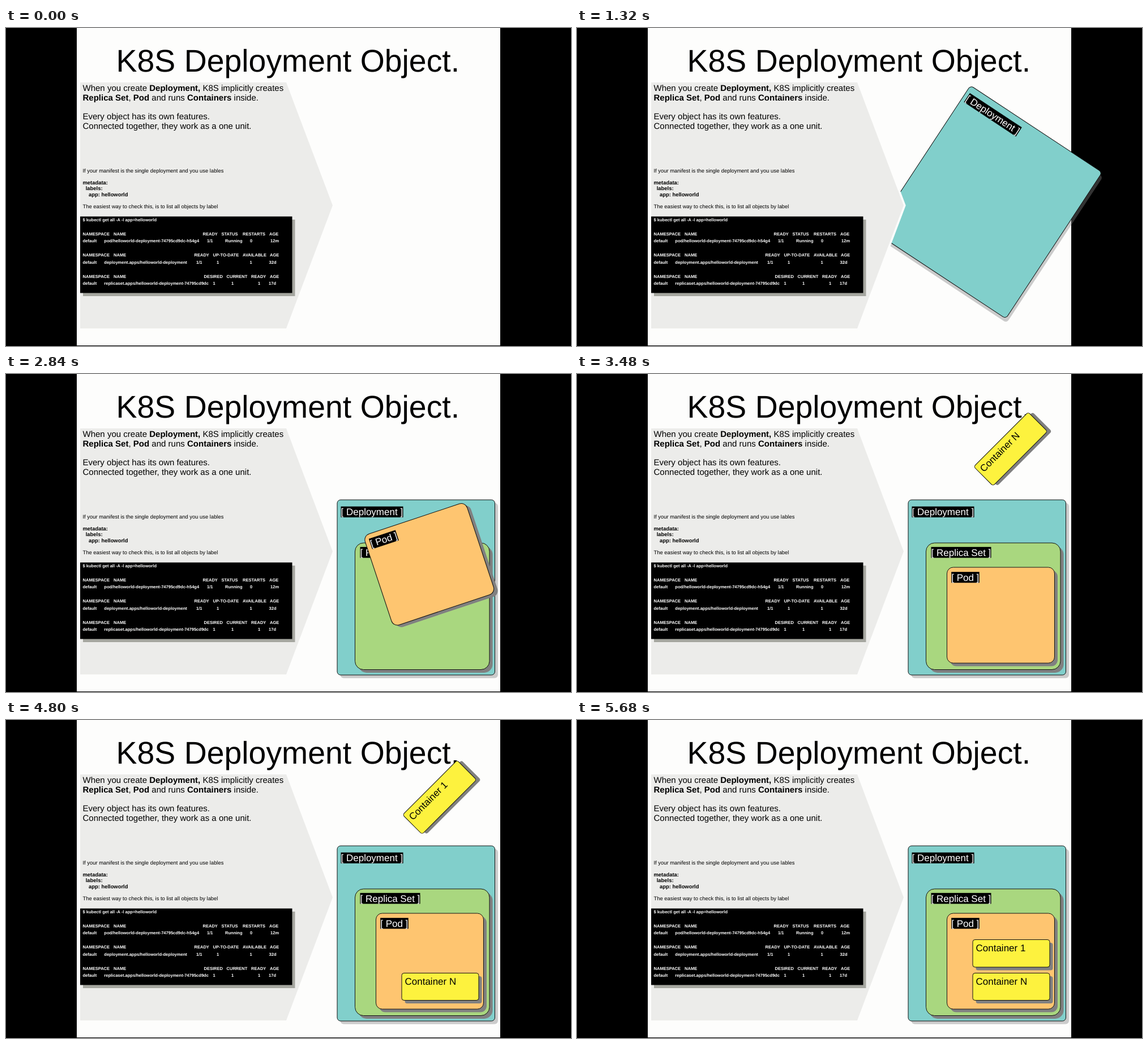
These frames come from a looping animation (998x561 px, 7 s). An HTML page:

```html
<!DOCTYPE html>
<html lang="en">
<head>
<meta charset="utf-8">
<title>K8S Deployment Object</title>
<style>
html, body { margin: 0; width: 100%; height: 100%; overflow: hidden; background: #000; }
svg { display: block; width: 100vw; height: 100vh; }
text { font-family: "Liberation Sans", Arial, sans-serif; white-space: pre; text-rendering: geometricPrecision; }
.body { font-size: 15.03px; }
.small { font-size: 9.41px; }
.term { font-size: 7.54px; font-weight: bold; fill: #fff; }
.label { font-size: 17px; }
.b { font-weight: bold; }
</style>
</head>
<body>
<svg viewBox="0 0 998 561" xmlns="http://www.w3.org/2000/svg">
  <rect width="998" height="561"/>
  <rect x="125" width="748" height="560" fill="#fdfdfc"/>
  <text x="194.6" y="76.5" font-size="55.4">K8S Deployment Object.</text>
  <g id="back"></g>
  <path d="M131 96H495L577 313L495 530H131Z" fill="#ececea" stroke="#fdfdfc" stroke-width="7" paint-order="stroke"/>
  <g id="copy"></g>
  <g id="front"></g>
</svg>
<script>
const NS = "http://www.w3.org/2000/svg";
const LOOP = 7000, STEP = 40, SLIDE_W = 748, SLIDE_H = 561, SHADOW = 5.5;
const $ = id => document.getElementById(id);

function add(parent, tag, attrs, text) {
  const el = document.createElementNS(NS, tag);
  for (const k in attrs) el.setAttribute(k, attrs[k]);
  if (text) el.textContent = text;
  parent.appendChild(el);
  return el;
}

const copy = $("copy");

// Text between asterisks is bold.
function line(cls, x, y, str) {
  const t = add(copy, "text", { class: cls, x, y });
  str.split("*").forEach((s, i) => s && add(t, "tspan", i % 2 ? { class: "b" } : {}, s));
}

line("body", 135.5, 110.7, "When you create *Deployment,* K8S implicitly creates");
line("body", 135.5, 127.5, "*Replica Set*, *Pod* and runs *Containers* inside.");
line("body", 135.5, 161.2, "Every object has its own features.");
line("body", 135.5, 178, "Connected together, they work as a one unit.");
line("small", 135.5, 254.5, "If your manifest is the single deployment and you use lables");
line("small", 135.5, 275.7, "*metadata:*");
line("small", 135.5, 286.2, "*  labels:*");
line("small", 135.5, 296.8, "*    app: helloworld*");
line("small", 135.5, 317.8, "The easiest way to check this, is to list all objects by label");

add(copy, "rect", { x: 136, y: 338, width: 374.5, height: 135, fill: "#a5a69f" });
add(copy, "rect", { x: 131, y: 332.5, width: 374.5, height: 135 });

// Each row: baseline, then x and text pairs.
const rows = [
  [340.8, 135.5, "$ kubectl get all -A -l app=helloworld"],
  [365.6, 135.5, "NAMESPACE", 190, "NAME", 347.5, "READY", 380.5, "STATUS", 418, "RESTARTS", 465, "AGE"],
  [378.2, 135.5, "default", 173.3, "pod/helloworld-deployment-74795cd9dc-h54g4", 355, "1/1", 387, "Running", 431, "0", 467, "12m"],
  [403.2, 135.5, "NAMESPACE", 190, "NAME", 332.5, "READY", 365.5, "UP-TO-DATE", 418, "AVAILABLE", 466, "AGE"],
  [415.7, 135.5, "default", 173.3, "deployment.apps/helloworld-deployment", 336, "1/1", 372, "1", 430.5, "1", 464.5, "32d"],
  [440.9, 135.5, "NAMESPACE", 190, "NAME", 349.5, "DESIRED", 389.5, "CURRENT", 433, "READY", 466, "AGE"],
  [453.4, 135.5, "default", 173.3, "replicaset.apps/helloworld-deployment-74795cd9dc", 365.5, "1", 398, "1", 445, "1", 464, "17d"]
];
for (const [y, ...cells] of rows)
  for (let i = 0; i < cells.length; i += 2) line("term", cells[i], y, cells[i + 1]);

// Keys pair a time in ms with progress through the fall.
const cards = [
  { layer: "back", x: 585, y: 222, w: 278.5, h: 309, r: 6, fill: "#81cfcb", shade: 0.4,
    label: "[ Deployment ]", tx: 591.5, ty: 249.2, tag: 110,
    keys: [[1000, 0.25], [1125, 0.455], [1320, 0.732], [1500, 1]] },
  { layer: "front", x: 616.5, y: 298, w: 237.5, h: 223.5, r: 15, fill: "#a9d77f", shade: 1,
    label: "[ Replica Set ]", tx: 625.5, ty: 320.6, tag: 106,
    keys: [[1560, 0.1], [2063, 0.455], [2120, 0.536], [2420, 1]] },
  { layer: "front", x: 653.5, y: 341, w: 190, h: 169, r: 11, fill: "#fec570", shade: 1,
    label: "[ Pod ]", tx: 661.2, ty: 364.6, tag: 49.5,
    keys: [[2440, 0.27], [2760, 0.455], [2840, 0.549], [3160, 1]] },
  { layer: "front", x: 699, y: 446.5, w: 136, h: 48, r: 4, fill: "#fdf23e", shade: 1,
    label: "Container N", tx: 704.5, ty: 466.5,
    keys: [[3280, 0.05], [3867, 0.455], [4000, 0.642], [4360, 1]] },
  { layer: "front", x: 699, y: 387.5, w: 136, h: 48.5, r: 4, fill: "#fdf23e", shade: 1,
    label: "Container 1", tx: 704.5, ty: 407.6,
    keys: [[4560, 0.14], [4800, 0.2416], [5280, 0.4456], [5660, 1]] }
];

for (const c of cards) {
  const box = { width: c.w, height: c.h, rx: c.r };
  c.el = add($(c.layer), "g", {});
  add(c.el, "rect", { ...box, x: c.x + SHADOW, y: c.y + SHADOW, fill: "#808080", "fill-opacity": c.shade });
  add(c.el, "rect", { ...box, x: c.x, y: c.y, fill: c.fill, stroke: "#111" });
  if (c.tag) add(c.el, "rect", { x: c.tx, y: c.ty - 15.5, width: c.tag, height: 19.2 });
  add(c.el, "text", { class: "label", x: c.tx, y: c.ty, fill: c.tag ? "#fff" : "#000" }, c.label);
}

const mix = (a, b, k) => a + (b - a) * k;

function track(keys, t) {
  for (let i = 1; i < keys.length; i++) {
    const [t0, v0] = keys[i - 1], [t1, v1] = keys[i];
    if (t < t1) return mix(v0, v1, (t - t0) / (t1 - t0));
  }
  return 1;
}

// Constant speed for the first half, then slowing to rest.
const slow = k => k < 0.5 ? k * 4 / 3 : 1 - 4 / 3 * (1 - k) ** 2;

// Drop tilted, bounce while swinging over, then settle flat.
function pose(w, h, p) {
  const lift = (0.354 * w / SLIDE_W - 0.172 * h / SLIDE_H) * SLIDE_H;
  let dy = -lift, rot = -45;
  if (p < 0.455) dy = mix(-SLIDE_H, -lift, p / 0.455);
  else if (p < 0.767) dy -= h / 2 * slow(1 - Math.abs(p - 0.611) / 0.156);
  else if (p > 0.864) dy = mix(-lift, 0, (p - 0.864) / 0.136);
  if (p > 0.91) rot = 0;
  else if (p > 0.773) rot = mix(45, 0, (p - 0.773) / 0.137);
  else if (p > 0.455) rot = mix(-45, 45, (p - 0.455) / 0.318);
  return [dy, rot];
}

function draw(ms) {
  const t = Math.floor(ms % LOOP / STEP) * STEP;
  for (const c of cards) {
    const on = t >= c.keys[0][0];
    c.el.setAttribute("visibility", on ? "visible" : "hidden");
    if (!on) continue;
    // The shadow counts towards the moving bounds.
    const w = c.w + SHADOW, h = c.h + SHADOW;
    const [dy, rot] = pose(w, h, track(c.keys, t));
    c.el.setAttribute("transform",
      `translate(0 ${dy}) rotate(${rot} ${c.x + w / 2} ${c.y + h / 2})`);
  }
}

const start = performance.now();
function tick() {
  draw(performance.now() - start);
  requestAnimationFrame(tick);
}
tick();
</script>
</body>
</html>
```
